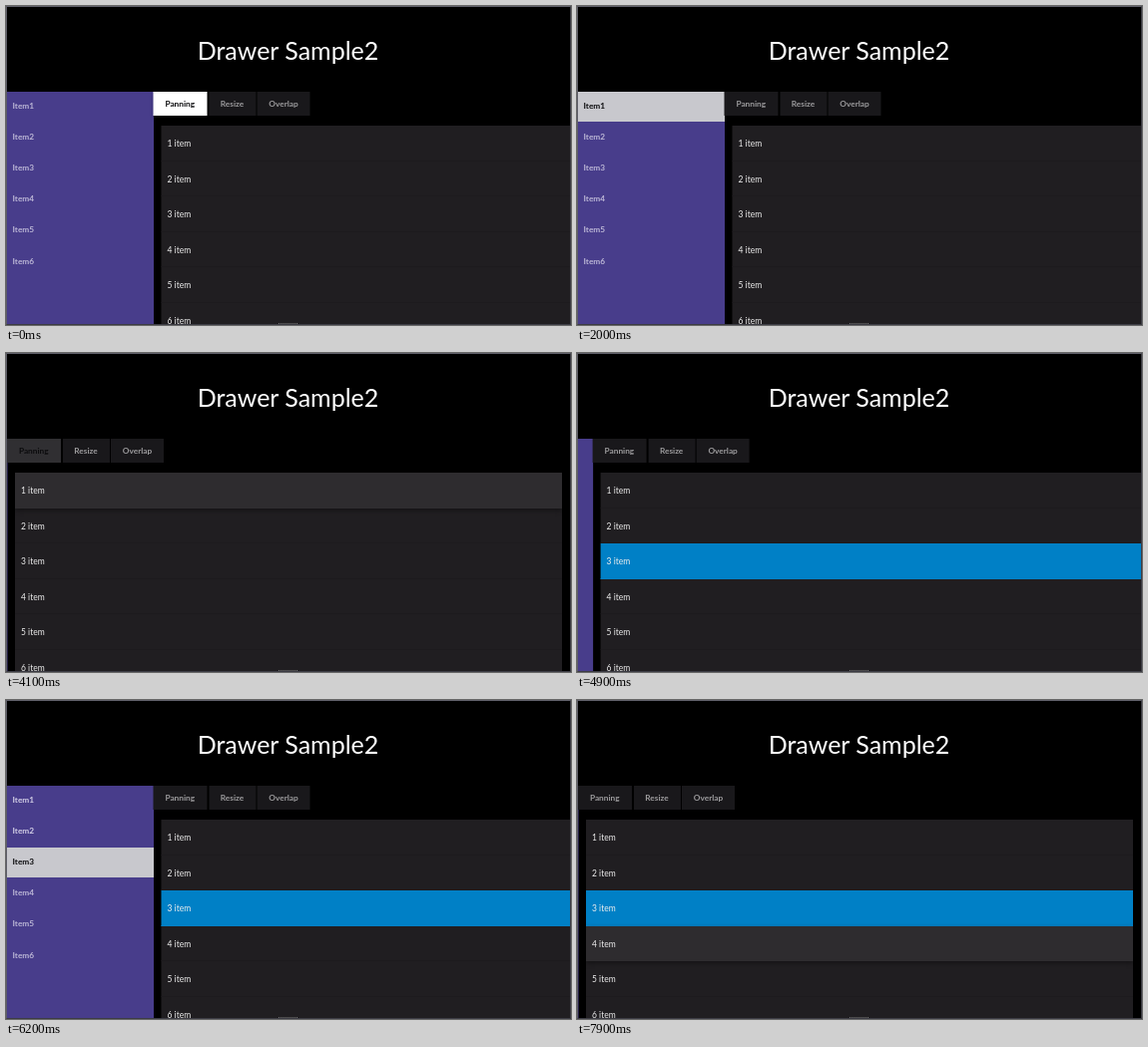
Animation of 566 by 320 pixels, one loop 8000 ms. Source, as an HTML page:

```html
<!DOCTYPE html>
<html lang="en">
<head>
<meta charset="utf-8">
<title>Drawer sample</title>
<style>
html, body { margin: 0; width: 100%; height: 100%; overflow: hidden; background: #000; }
#stage { position: relative; width: 566px; height: 320px; overflow: hidden; background: #000;
  font-family: Lato, "Noto Sans", sans-serif; box-sizing: border-box;
  border: 1px solid #3c3c44; border-top-color: #5e5e68; border-left-color: #5e5e68; }
h1 { position: absolute; left: 0; top: 25px; width: 563px; margin: 0; text-align: center;
  font-size: 25px; font-weight: 400; line-height: 36px; color: #fff; }
#view { position: absolute; left: 0; top: 85px; width: 564px; height: 233px; overflow: hidden; }
#drawer, #content { position: absolute; left: 0; top: 0; height: 100%; }
#drawer { width: 146.5px; background: #483d8b; }
#content { width: 564px; }
#drawer div, #content div { position: absolute; box-sizing: border-box; white-space: nowrap; }
#drawer div { left: 0; width: 100%; height: 29.5px; padding-left: 5.5px;
  font-size: 8.3px; font-weight: 700; line-height: 29px; }
#content .tab { top: 0; height: 23.5px; text-align: center;
  font-size: 8.3px; font-weight: 700; line-height: 24px; }
#content .row { left: 8px; width: 547.5px; height: 35.6px; padding-left: 6px;
  border-bottom: 1px solid #1d1b1e; font-size: 8.5px; line-height: 36px; color: #eee; }
#mark { position: absolute; left: 272px; bottom: 0; width: 19px; border-bottom: 1px dotted #777; }
</style>
</head>
<body>
<div id="stage">
  <h1>Drawer Sample2</h1>
  <div id="view"><div id="drawer"></div><div id="content"></div></div>
  <div id="mark"></div>
</div>
<script>
const LOOP = 8000, WIDTH = 146.5, SLIDE = 300;
const drawer = document.getElementById("drawer");
const content = document.getElementById("content");

function add(parent, cls, text, css) {
  const el = document.createElement("div");
  el.className = cls;
  el.textContent = text;
  Object.assign(el.style, css);
  return parent.appendChild(el);
}

const items = [1, 2, 3, 4, 5, 6].map((n, i) =>
  add(drawer, "item", "Item" + n, { top: i * 31.1 + "px" }));
const tabs = [["Panning", 0, 53.5], ["Resize", 55.5, 47], ["Overlap", 104, 53]].map(([name, x, w]) =>
  add(content, "tab", name, { left: x + "px", width: w + "px" }));
const rows = [1, 2, 3, 4, 5, 6].map((n, i) =>
  add(content, "row", n + " item", { top: 34 + i * 35.6 + "px" }));

// Focus periods [on, off] in ms, by index
const tabFocus = [
  [[-300, 60], [360, 760], [960, 1750], [3560, 3875]],
  [[60, 360], [760, 960]],
  []
];
const itemFocus = [[[1750, 2170]], [[2170, 3560], [5180, 5870]], [[5870, 6750]]];
const rowFocus = [[[3875, 4370]], [], [[4370, 4670]], [[7750, 8000]]];

const clamp = v => Math.max(0, Math.min(1, v));
const within = (t, spans = []) => spans.some(([on, off]) => t >= on && t < off);
const level = (t, spans, fade) => Math.max(0, ...spans.map(([on, off]) =>
  Math.min(clamp((t - on) / 40), clamp(1 - (t - off) / fade))));
const mix = (a, b, k) => `rgb(${a.map((v, i) => Math.round(v + (b[i] - v) * k))})`;

function ease(t, start) {
  const k = clamp((t - start) / SLIDE);
  return k < .5 ? 2 * k * k : 1 - 2 * (1 - k) ** 2;
}

function draw(now) {
  const t = now % LOOP;
  const open = 1 - ease(t, 2804) + ease(t, 4833) - ease(t, 6390);
  drawer.style.transform = `translateX(${WIDTH * (open - 1)}px)`;
  content.style.transform = `translateX(${WIDTH * open}px)`;

  tabs.forEach((el, i) => {
    const k = level(t, tabFocus[i], 250);
    el.style.background = mix([25, 24, 27], [255, 255, 255], k);
    el.style.color = k > .02 ? "#0c0c0e" : "#9c9b9d";
    el.style.boxShadow = k ? `0 2px 4px rgba(0,0,0,${k * .3})` : "none";
  });
  items.forEach((el, i) => {
    const on = within(t, itemFocus[i]);
    el.style.background = on ? "#c8c8cd" : "transparent";
    el.style.color = on ? "#0a0a0c" : i < 2 && t > 5180 ? "#d3cfe6" : "#bcb7d6";
  });
  rows.forEach((el, i) => {
    const on = within(t, rowFocus[i]);
    const chosen = i === 2 && t >= 4670;
    el.style.background = chosen ? "#0080c6" : on ? "#2e2c2f" : "#201e21";
    el.style.borderColor = chosen ? "#0080c6" : on ? "#2e2c2f" : "#1d1b1e";
    el.style.boxShadow = on && !chosen ? "0 2px 5px rgba(0,0,0,.4)" : "none";
    el.style.zIndex = on ? 1 : 0;
  });
}

let start;
function tick(now) {
  start ??= now;
  draw(now - start);
  requestAnimationFrame(tick);
}
draw(0);
requestAnimationFrame(tick);
</script>
</body>
</html>
```
